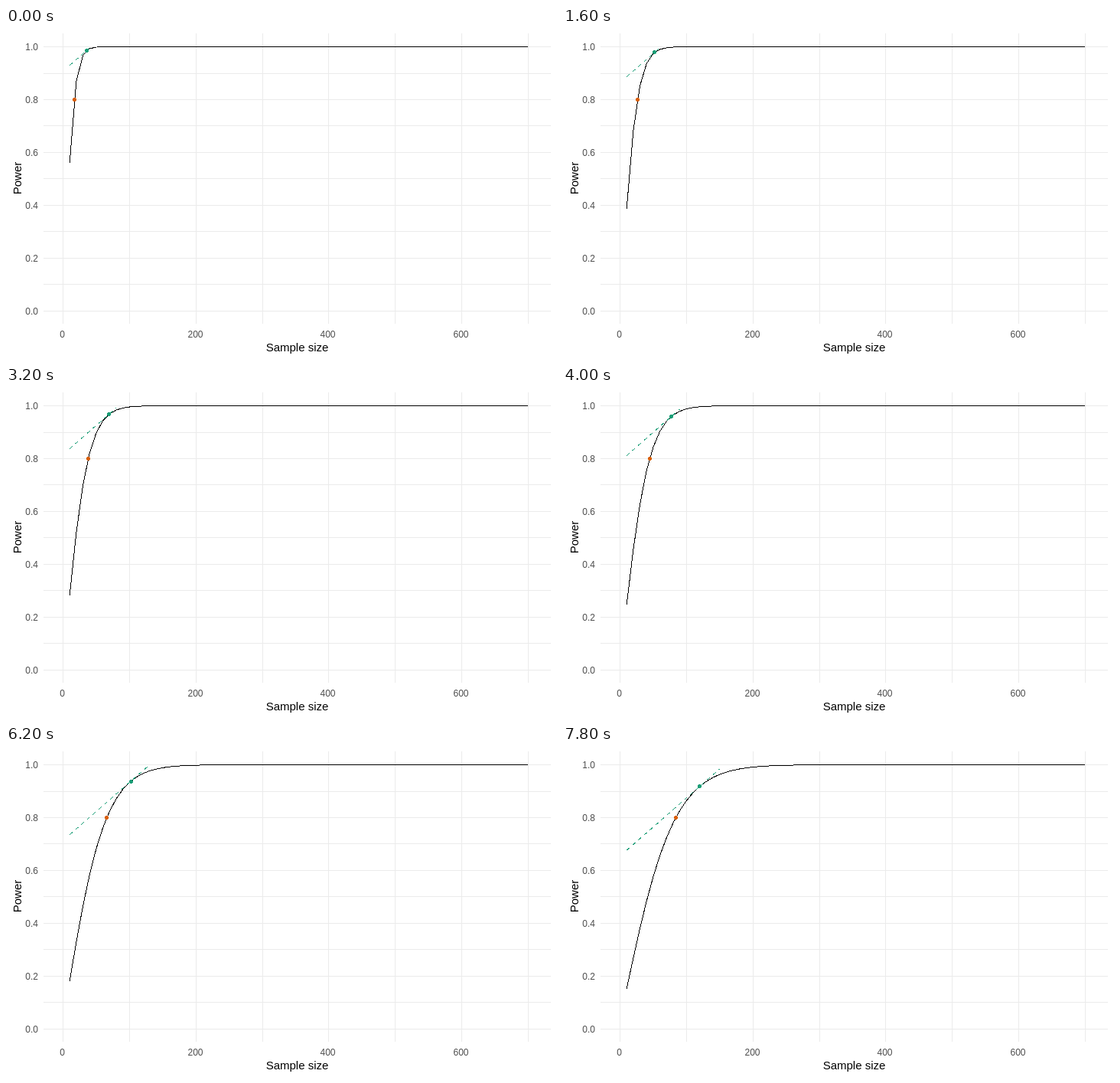
An HTML page that plays this animation: 720x432 px, repeating every 8000 ms.

```html
<!DOCTYPE html>
<html lang="en">
<head>
<meta charset="utf-8">
<title>Power curve</title>
<style>
  html, body { margin: 0; width: 100%; height: 100%; overflow: hidden; background: #fff; }
  svg { display: block; width: 720px; height: 432px; }
  text { font-family: "Liberation Sans", Arial, sans-serif; }
  .tick { font-size: 12px; fill: #4d4d4d; }
  .title { font-size: 15px; fill: #000; text-anchor: middle; }
  path, circle { shape-rendering: crispEdges; }
  path { fill: none; stroke-width: 1; }
</style>
</head>
<body>
<svg id="plot" viewBox="0 0 720 432"></svg>
<script>
const STEP = 200, STEPS = 40;
const WANTED = 0.8, SLOPE = 0.0022;
const svg = document.getElementById('plot');
const X = n => 74.5 + 0.8685 * n;
const Y = p => 369.15 - 344.6 * p;
const mid = v => Math.floor(v) + 0.5;

function add(tag, attrs, text) {
  const el = document.createElementNS('http://www.w3.org/2000/svg', tag);
  for (const key in attrs) el.setAttribute(key, attrs[key]);
  if (text) el.textContent = text;
  return svg.appendChild(el);
}

// Normal distribution function
function phi(z) {
  const x = Math.abs(z) / Math.SQRT2, t = 1 / (1 + 0.3275911 * x);
  const poly = t * (0.254829592 + t * (-0.284496736 + t * (1.421413741 + t * (-1.453152027 + t * 1.061405429))));
  const tail = poly * Math.exp(-x * x) / 2;
  return z > 0 ? 1 - tail : tail;
}

// Power of a two-sided, two-sample t test with n per group
function power(n, d) {
  const v = 2 * n - 2, z = 1.959964, shift = d * Math.sqrt(n / 2);
  const crit = z + (z ** 3 + z) / (4 * v) + (5 * z ** 5 + 16 * z ** 3 + 3 * z) / (96 * v * v);
  const c = crit * (1 - 1 / (4 * v)), s = Math.sqrt(1 + crit * crit / (2 * v));
  return phi((shift - c) / s) + phi((-shift - c) / s);
}

const sizes = Array.from({ length: 70 }, (_, i) => 10 * (i + 1));
const toPath = pts => 'M' + pts.map(([n, p]) => X(n).toFixed(2) + ' ' + Y(p).toFixed(2)).join('L');

// Grid and labels
let grid = '';
for (let i = 0; i <= 10; i++) grid += `M49 ${mid(Y(i / 10))}H712`;
for (let i = 0; i <= 7; i++) grid += `M${mid(X(i * 100))} 7V386`;
add('path', { d: grid, stroke: '#ebebeb' });
for (let i = 0; i <= 5; i++) {
  const p = i / 5;
  add('text', { class: 'tick', x: 42, y: Math.floor(Y(p)) + 5, 'text-anchor': 'end' }, p.toFixed(1));
}
for (let n = 0; n <= 600; n += 200) {
  add('text', { class: 'tick', x: Math.floor(X(n)) - 0.5, y: 404, 'text-anchor': 'middle' }, String(n));
}
add('text', { class: 'title', x: 380.5, y: 422 }, 'Sample size');
add('text', { class: 'title', transform: 'translate(20 196) rotate(-90)' }, 'Power');

const curve = add('path', { stroke: '#000' });
const tangent = add('path', { stroke: '#1b9e77', 'stroke-dasharray': '5 5' });
const knee = add('circle', { r: 2.5, fill: '#1b9e77' });
const goal = add('circle', { r: 2.5, fill: '#d95f02' });

function place(dot, n, p) {
  dot.setAttribute('cx', mid(X(n)));
  dot.setAttribute('cy', mid(Y(p)));
}

function draw(k) {
  const d = 30 / (30 + k);
  const pts = sizes.map(n => [n, power(n, d)]);
  curve.setAttribute('d', toPath(pts));

  const i = pts.findIndex(pt => pt[1] >= WANTED);
  const [n0, p0] = pts[i - 1], [n1, p1] = pts[i];
  place(goal, n0 + (n1 - n0) * (WANTED - p0) / (p1 - p0), WANTED);

  // First size whose gain drops below the slope
  let n = n1;
  while (power(n, d) - power(n - 1, d) >= SLOPE) n++;
  const p = power(n, d);
  place(knee, n, p);
  tangent.setAttribute('d', toPath(sizes.map(m => [m, p + SLOPE * (m - n)]).filter(pt => pt[1] <= 1)));
}

let shown = -1;
const start = performance.now();
function tick() {
  const k = Math.floor((performance.now() - start) / STEP) % STEPS;
  if (k !== shown) draw(shown = k);
  requestAnimationFrame(tick);
}
tick();
</script>
</body>
</html>
```
